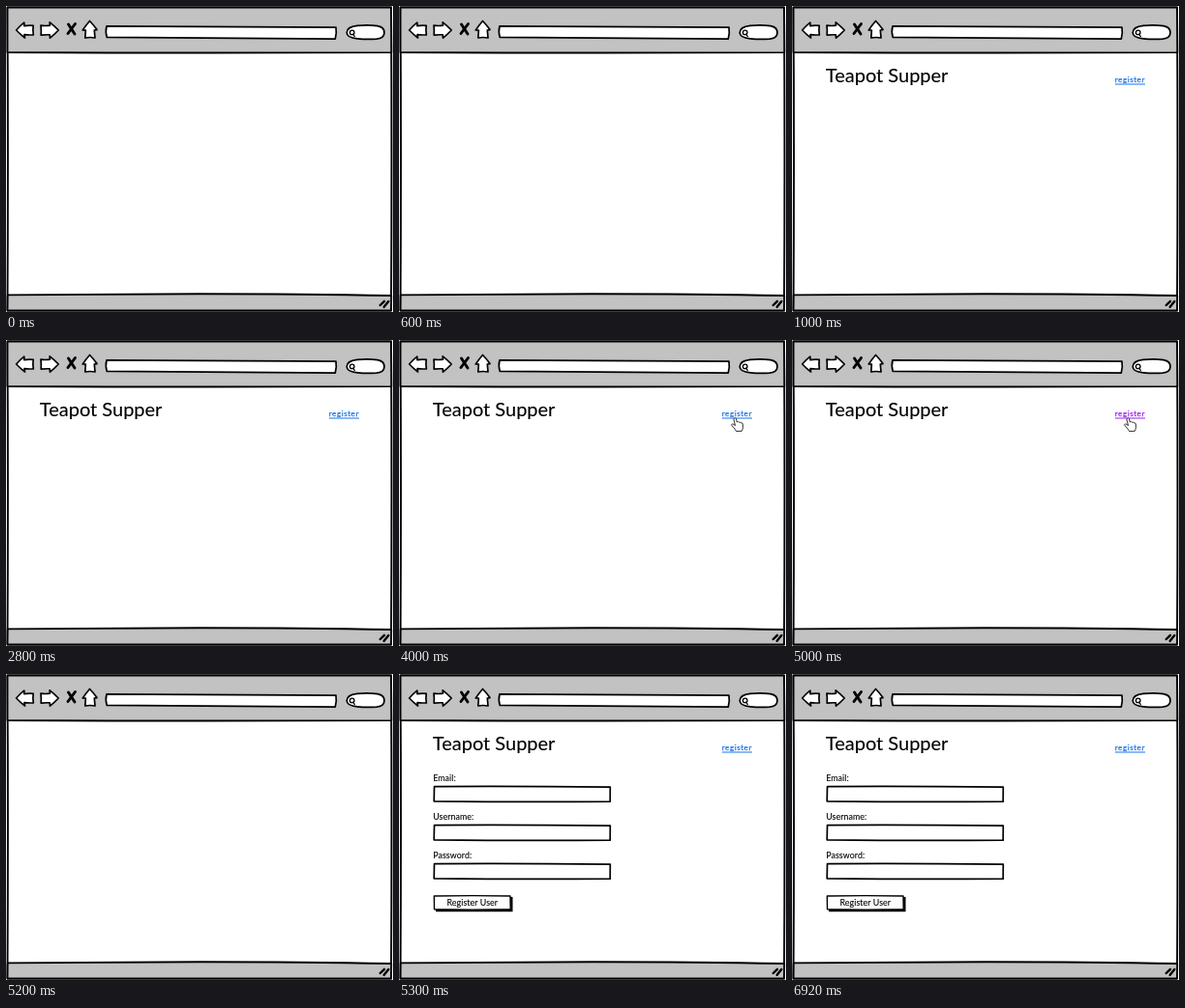
Write an HTML page that moves like this. It is 400 by 317 pixels and loops after 8 s.

```html
<!DOCTYPE html>
<html lang="en">
<head>
<meta charset="utf-8">
<title>Browser sketch</title>
<style>
  html, body { margin: 0; width: 100%; height: 100%; overflow: hidden; background: #fff; }
  svg { display: block; width: 100%; height: 100%; }
  .ink { fill: #fff; stroke: #000; stroke-width: 1.7; stroke-linejoin: round; stroke-linecap: round; }
  .bar { fill: #c2c2c2; }
  .line { fill: none; }
  text { font: 8.8px Lato, "Open Sans", sans-serif; letter-spacing: .1px; stroke: #000; stroke-width: .1; }
  #title { font-size: 20px; letter-spacing: 0; stroke-width: .1; }
  #link { fill: var(--link); }
  #link text { font-size: 8.2px; letter-spacing: .5px; stroke: var(--link); stroke-width: .25; }
</style>
</head>
<body>
<svg viewBox="0 0 400 317">
  <!-- window -->
  <g class="ink" style="stroke-width:1.9">
    <path d="M1.5 1.5Q200 .9 398 1.5Q399 160 398 315.5Q200 315.7 1.5 315.5Q2.4 160 1.5 1.5Z"/>
    <path class="bar" d="M1.5 1.5Q200 .9 398 1.5L398.3 48.1Q200 49 1.5 48Z"/>
    <path class="bar" d="M1.7 299.4Q100 298.4 200 298.2Q310 298.2 398.2 300L398 315.5Q200 315.7 1.5 315.5Z"/>
  </g>
  <!-- toolbar -->
  <g class="ink">
    <path d="M10.6 25Q14.5 20.5 18.8 17.2L18.8 20.6Q24 19.8 28.2 20.4Q27.5 25 28.3 29.8Q24 30.3 19 29.6L19.5 33Q15 29.5 10.6 25Z"/>
    <path d="M36 20.2Q41 20.8 45.4 20.2L45.2 16.8Q50 20.5 54.2 25Q50 29.5 45.5 33.2L45.2 29.8Q41 29.6 36.2 30.2Q36.6 25 36 20.2Z"/>
    <path class="line" style="stroke-width:2.9" d="M64.5 19L71 29M71.5 18.5L64 28.5"/>
    <path d="M86.5 15.5Q90.5 19.5 94 24.6L91.3 25L92 33Q86.8 32 81.8 33L82.3 25.2L79.3 25Q82.6 20 86.5 15.5Z"/>
    <path d="M104 20.8Q220 21.3 341 22.2Q342 28 340.3 34.1Q220 33.2 104.3 32.4Q102.5 27 104 20.8Z"/>
    <path d="M363 20.4Q374 19.2 384 20.6Q391.4 22 391 28Q390.6 33.6 383 34.2Q372 34.8 363 33.8Q352.4 33 352.2 27.5Q352.4 21.6 363 20.4Z"/>
    <path class="line" style="stroke-width:1.3" d="M358.6 29.3L360.3 31.4M360 27.4A2.3 2.3 0 1 1 355.4 27.4A2.3 2.3 0 1 1 360 27.4"/>
    <path class="line" style="stroke-width:2.4" d="M386.7 310L391 305.8M390.7 311.8L395.3 306"/>
  </g>
  <g id="page">
    <text id="title" x="34.8" y="79.3">Teapot Supper</text>
    <g id="link">
      <text x="333.8" y="79.2">register</text>
      <rect x="334" y="80.5" width="31" height="1"/>
    </g>
  </g>
  <g id="form">
    <g id="fields"></g>
    <path d="M38 231H117.5V246.3H38Z"/>
    <path class="ink" style="stroke-width:1.4" d="M36.3 230Q76 229.3 115 230L115.2 243.8Q76 244.4 36.5 243.8Z"/>
    <text x="75.8" y="240.2" text-anchor="middle">Register User</text>
  </g>
  <path id="hand" class="ink" style="stroke-width:.8"
    d="M346.1 81.5Q347.4 79.6 348.5 81.5L349.2 85Q350.5 83.7 351.4 85.3Q352.8 84.3 353.5 86Q354.9 85.3 355.3 87L355.5 90.5Q355.3 92.3 354.3 94.4L348.5 94.5Q347.6 92.3 345.3 90.2L343.6 87.8Q344.3 86 346.1 87.5L347.2 88.4Z"/>
</svg>
<script>
const get = id => document.getElementById(id);
const show = (id, on) => get(id).style.display = on ? "" : "none";

get("fields").innerHTML = ["Email:", "Username:", "Password:"].map((label, i) => `
  <g transform="translate(0 ${i * 40})">
    <text x="35.2" y="110.6">${label}</text>
    <path class="ink" d="M36.5 116.6Q120 116 218.3 117.2L218.2 132.2Q120 132.7 36.2 131.8Z"/>
  </g>`).join("");

function draw(now) {
  const t = now % 8000;
  show("page", t >= 1000 && t < 5200 || t >= 5300);
  show("hand", t >= 4000 && t < 5200);
  show("form", t >= 5300);
  get("link").style.setProperty("--link", t >= 5000 && t < 5200 ? "#9a1ff0" : "#1a73e8");
  requestAnimationFrame(draw);
}
draw(performance.now());
</script>
</body>
</html>
```
